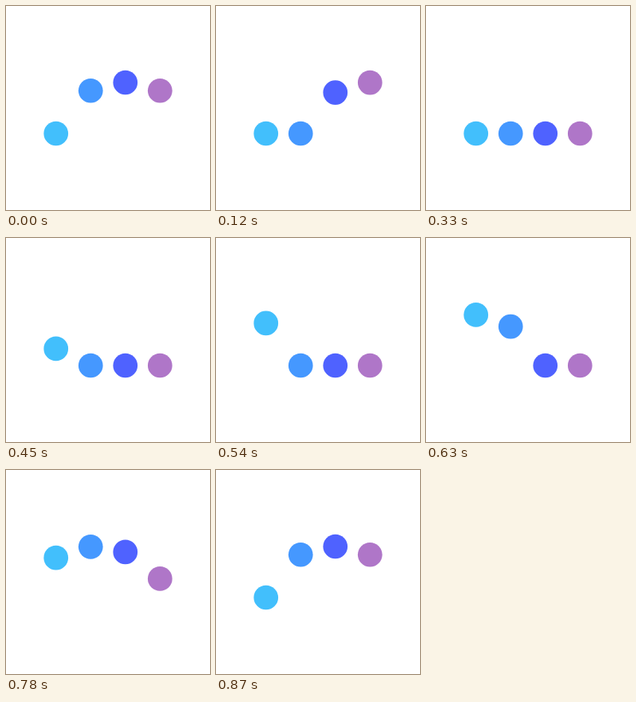
Write an HTML page that moves like this. It is 256 by 256 pixels and loops after 900 ms.

```html
<!DOCTYPE html>
<html lang="en">
<head>
<meta charset="utf-8">
<title>Bouncing dots</title>
<style>
  html, body { margin: 0; width: 100%; height: 100%; overflow: hidden; background: #fff; }
  svg { display: block; width: 100%; height: 100%; }
</style>
</head>
<body>
<svg id="stage" viewBox="0 0 256 256"></svg>
<script>
const DURATION = 900;
const STEPS = 30;
const FLOOR = 160;
const RISE = 64;
const COLORS = ['#42bffc', '#4598ff', '#4f62ff', '#af76c8'];

// cubic-bezier(0, .5, .5, 1), solved for x by bisection
function easeOut(x) {
  let lo = 0, hi = 1;
  for (let i = 0; i < 40; i++) {
    const s = (lo + hi) / 2;
    if (1.5 * s * s - 0.5 * s ** 3 < x) lo = s; else hi = s;
  }
  return 1.5 * lo - 0.5 * lo ** 3;
}

// Up for a quarter of the cycle, down for a quarter, then rest
function height(phase) {
  const p = phase - Math.floor(phase);
  return p < 0.5 ? RISE * easeOut(1 - Math.abs(p * 4 - 1)) : 0;
}

function bounce(index) {
  const frames = [];
  for (let i = 0; i <= STEPS; i++) {
    // Both ends of the cycle are shown, so the last step equals the first
    const time = Math.min(i, STEPS - 1) / (STEPS - 1);
    const phase = time + 0.5 - index * 0.125;
    frames.push({
      offset: i / STEPS,
      cy: `${FLOOR - height(phase)}px`,
      easing: 'steps(1, end)'
    });
  }
  return frames;
}

const stage = document.getElementById('stage');
COLORS.forEach((color, index) => {
  const dot = document.createElementNS('http://www.w3.org/2000/svg', 'circle');
  dot.setAttribute('cx', 62.72 + 43.52 * index);
  dot.setAttribute('cy', FLOOR);
  dot.setAttribute('r', 15.36);
  dot.setAttribute('fill', color);
  stage.append(dot);
  dot.animate(bounce(index), { duration: DURATION, iterations: Infinity });
});
</script>
</body>
</html>
```
